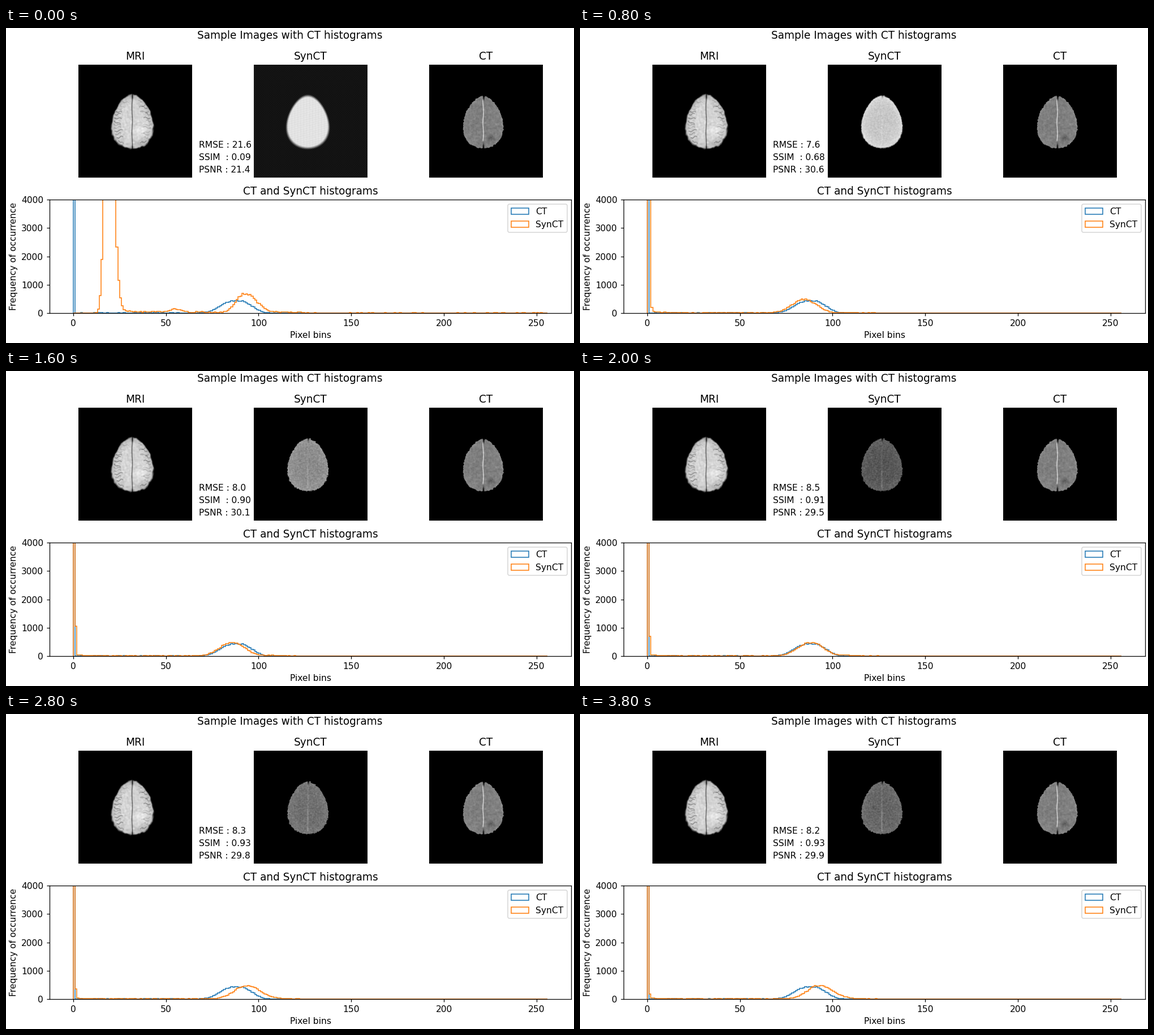
A matplotlib script that plays this animation: 1004 by 558 pixels, repeating every 8800 ms.

```python
import numpy as np
import matplotlib.pyplot as plt
from matplotlib.animation import FuncAnimation
from matplotlib.patches import Patch

W, H, DPI = 1004, 558, 128
K = 111.3 / DPI  # scale from the default point sizes
STEPS, FRAMES, INTERVAL = 20, 44, 200
BLUE, ORANGE = "tab:blue", "tab:orange"

plt.rcParams["font.family"] = "DejaVu Sans"
for name in ("font.size", "axes.linewidth", "axes.titlepad", "axes.labelpad",
             "patch.linewidth",
             "xtick.major.size", "xtick.major.width", "xtick.major.pad",
             "ytick.major.size", "ytick.major.width", "ytick.major.pad"):
    plt.rcParams[name] *= K

# Key points of the training run
KEYS = [0, 2, 6, 10, 14, 17, 19]
RMSE = [21.6, 7.655, 7.47, 8.52, 8.27, 7.98, 8.17]
SSIM = [0.09, 0.48, 0.88, 0.91, 0.93, 0.93, 0.93]
CENTRE = [92.5, 86, 84, 88.5, 94, 92, 93.5]
LEVEL = [226, 208, 192, 88, 112, 100, 102]


def at(step, track):
    return np.interp(step, KEYS, track)


def decay(step, span):
    return np.exp(-step / span)


def ramp(step, span):
    return min(step / span, 1)


# ---- histograms -----------------------------------------------------------
BINS = np.arange(256)
EDGES = np.arange(257)
MID = BINS + 0.5
PIXELS = 57000  # background pixels in a scan


def hump(centre, height, left, right, power=2.0):
    d = MID - centre
    return height * np.exp(-np.abs(d / np.where(d < 0, left, right)) ** power)


def jitter(seed, size):
    return np.random.default_rng(seed).normal(1, size, 256)


def floor(seed, size):
    fade = np.where(BINS < 72, 1.0, np.where(BINS < 125, 0.8, 0.25))
    return size * fade * np.random.default_rng(seed).uniform(0.4, 1.2, 256)


def syn_counts(step):
    # the background peak slides to zero and narrows
    fast = decay(step, 0.67)
    zero = 0.4 + 18.5 * decay(step, 1)
    left = 0.73 + 1.9 * fast
    right = 0.4 + 0.34 * decay(step, 10) + 3 * fast
    height = PIXELS * 2 / (np.sqrt(np.pi) * (left + right))
    peak = hump(zero, height, left, right)

    past = MID - zero
    skirt = (40 + 160 * decay(step, 3)) * np.exp(-np.abs(past) / 5)
    base = skirt + floor(80 + step, 18 + 35 * decay(step, 1))
    width = 0.6 + 3 * decay(step, 1.6)
    bump = hump(55 * decay(step, 1.14), 110 + 100 * min(step, 2), width, width)

    body = hump(at(step, CENTRE), 468 + 180 * decay(step, 0.7),
                9.8 - 3.6 * decay(step, 1), 9, 2.2)
    tail = hump(107, 35 * ramp(step, 14), 6, 6)
    return peak + bump + base * (past > 0) + body * jitter(step, 0.03) + tail


def ct_counts():
    counts = hump(88.5, 428, 11.6, 10, 2.7) * jitter(5, 0.025)
    counts += floor(6, 14) * (BINS > 1)
    counts[0] = PIXELS
    return counts


# ---- scans ----------------------------------------------------------------
N = 201
V, U = np.mgrid[0:N, 0:N].astype(float)


def grain(seed, blur=1):
    a = np.random.default_rng(seed).normal(size=(N, N))
    for _ in range(blur):
        a = (a + np.roll(a, 1, 0) + np.roll(a, -1, 0)
             + np.roll(a, 1, 1) + np.roll(a, -1, 1)) / 5
    return a / a.std()


def egg(cx, cy, a, b, k=0.21):
    """Normalised radius: 1 on the outline, narrower at the top."""
    t = (V - cy) / b
    wide = a * (1 + k * np.clip(t, -1.3, 1.3))
    return np.hypot((U - cx) / wide, t)


def mask(rho, soft, size=40):
    x = np.clip((1 - rho) * size / soft + 0.5, 0, 1)
    return x * x * (3 - 2 * x)


def blob(x, y, rx, ry):
    return np.exp(-((U - x) / rx) ** 2 - ((V - y) / ry) ** 2)


def stroke(x, y, dx, dy, width=1.0):
    s = np.clip(((U - x) * dx + (V - y) * dy) / (dx * dx + dy * dy), 0, 1)
    bend = 1.2 * np.sin(s * 6)
    d = np.hypot(U - x - s * dx, V - y - s * dy - bend)
    return np.exp(-(d / width) ** 2)


def mri_scan():
    rng = np.random.default_rng(11)
    rho = egg(95, 101.8, 36.3, 47.6) + 0.012 * grain(1, 8)
    tone = 212 + 6 * grain(2, 3) - 26 * np.clip(rho, 0, 1) ** 5
    tone += 18 * blob(110, 119, 12, 10) - 16 * blob(112, 138, 9, 7)
    for side in (-1, 1):
        for y in np.arange(66, 138, 5.8):
            half = 32 * np.sqrt(1 - ((y - 105) / 46) ** 2)
            tone -= rng.uniform(25, 75) * stroke(
                95 + side * half, y,
                -side * rng.uniform(6, 14), rng.uniform(-3, 5))
    mid = 94.5 + 0.4 * np.sin(V / 7)
    tone -= 110 * np.exp(-((U - mid) / 0.9) ** 2)
    tone -= 60 * (blob(95, 56, 3, 5) + blob(95, 148, 3, 4))
    return tone * mask(rho, 4)


def ct_scan():
    rho = egg(95, 102.3, 35, 46.2) + 0.012 * grain(3, 2)
    tone = 126 + 4 * grain(4) + 4 * grain(5, 5) + 8 * np.clip(rho, 0, 1) ** 6
    tone -= 28 * blob(110, 131, 7, 4) + 16 * blob(104, 137, 4, 5)
    mid = 95 + 0.5 * np.sin(V / 6)
    tone += 95 * np.exp(-((U - mid) / 0.8) ** 2) * mask(np.abs(V - 99) / 37, 4)
    tone *= 1 - 0.95 * (blob(96, 57, 1.4, 7) + blob(95.5, 147, 1.4, 7))
    return tone * mask(rho, 1.5)


def syn_scan(step):
    level = at(step, LEVEL)
    soft = 1.5 + 4.5 * decay(step, 3)
    rho = egg(95, 102, 35.2 + soft * 0.2, 46.3)
    rho += 0.012 * ramp(step, 8) * grain(7, 2)

    rim = 0.12 * level * ramp(step, 2)
    tone = level + rim * (np.clip(rho, 0, 1) ** 4 - 0.1)
    weave = np.sin((U + V) * 0.8) * np.cos((U - 2 * V) * 0.4)
    tone += 5 * decay(step, 4) * weave
    tone += (1 + 6 * ramp(step, 6)) * grain(100 + step)
    lower = 0.4 + 0.6 / (1 + np.exp(-(V - 100) / 5))
    seam = np.exp(-((U - 95) / 1.3) ** 2) * (np.abs(V - 102) < 42)
    tone += 32 * ramp(step, 14) * lower * seam

    inside = mask(rho, soft) * (1 - 0.8 * ramp(step, 10) * blob(96, 56, 1.5, 4))
    edge = np.maximum(np.abs(U - 100), np.abs(V - 100)) > 98
    back = 1 + 0.14 * np.sin(U * 1.57) * np.sin(V * 1.57) + 0.35 * edge
    return tone * inside + 19 * decay(step, 0.67) * back * (1 - inside)


# ---- figure ---------------------------------------------------------------
fig = plt.figure(figsize=(W / DPI, H / DPI), dpi=DPI, facecolor="white")


def axes_px(x, y, w, h):
    return fig.add_axes([x / W, 1 - (y + h) / H, w / W, h / H])


def text_px(x, y, s, **kw):
    return fig.text(x / W, 1 - y / H, s, va="baseline", **kw)


def show_scan(x, title, data):
    ax = axes_px(x, 65, 200.5, 200.5)
    ax.set_title(title)
    ax.axis("off")
    return ax.imshow(data, cmap="gray", vmin=0, vmax=255, aspect="auto",
                     interpolation="nearest")


text_px(501.7, 19, "Sample Images with CT histograms", ha="center",
        fontsize=12 * K)
show_scan(128, "MRI", mri_scan())
syn_img = show_scan(438, "SynCT", syn_scan(0))
show_scan(748, "CT", ct_scan())
scores = [text_px(341, y, "") for y in (211.5, 234, 256.5)]

hist = axes_px(77, 304.2, 922.4, 201)
hist.set_title("CT and SynCT histograms")
hist.set_xlabel("Pixel bins")
hist.set_ylabel("Frequency of occurrence")
hist.stairs(ct_counts(), EDGES, color=BLUE, lw=K)
syn_line = hist.stairs(syn_counts(0), EDGES, color=ORANGE, lw=K)
hist.set(xlim=(-12.8, 268.8), ylim=(0, 4000),
         xticks=range(0, 251, 50), yticks=range(0, 4001, 1000))
hist.legend(handles=[Patch(fill=False, edgecolor=BLUE, label="CT"),
                     Patch(fill=False, edgecolor=ORANGE, label="SynCT")],
            loc="upper right")


def draw(frame):
    step = min(frame, STEPS - 1)
    rmse = at(step, RMSE)
    psnr = 20 * np.log10(255 / rmse)
    syn_img.set_data(syn_scan(step))
    syn_line.set_data(syn_counts(step), EDGES)
    scores[0].set_text(f"RMSE : {rmse:.1f}")
    scores[1].set_text(f"SSIM  : {at(step, SSIM):.2f}")
    scores[2].set_text(f"PSNR : {psnr:.1f}")
    return [syn_img, syn_line, *scores]


anim = FuncAnimation(fig, draw, frames=FRAMES, interval=INTERVAL,
                     repeat=True, repeat_delay=0, blit=False)
plt.show()
```
